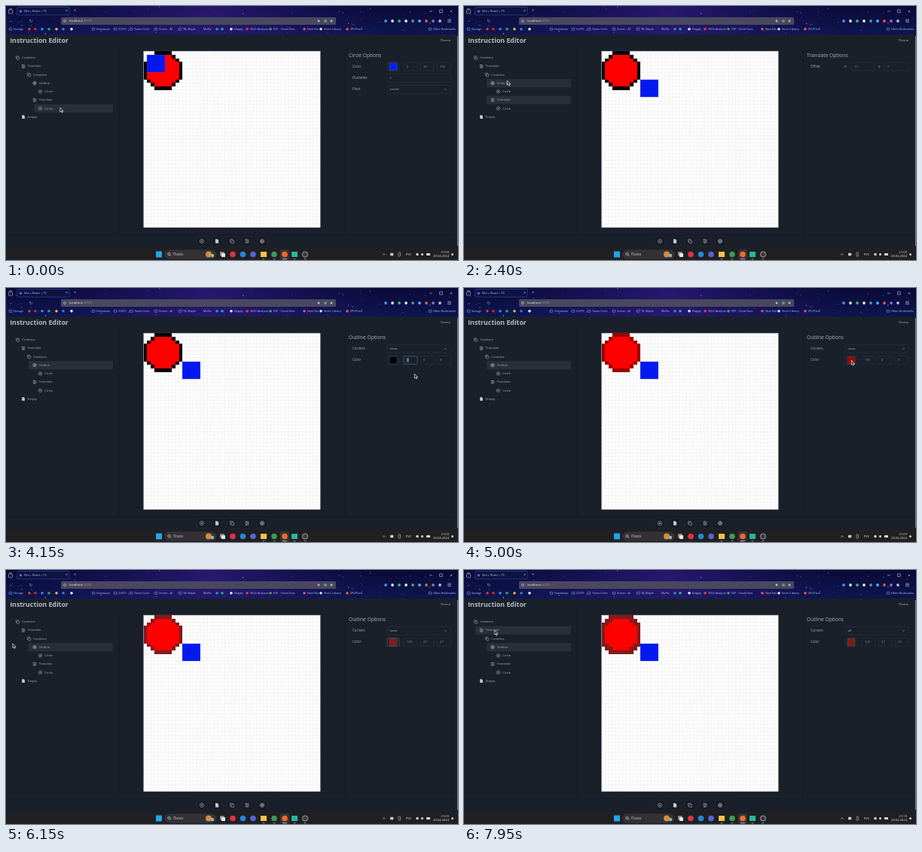
Animation, 600 px wide and 338 px high, one loop 8000 ms. Source, as an HTML page with a canvas:

```html
<!DOCTYPE html>
<html lang="en">
<head>
<meta charset="utf-8">
<title>Instruction Editor</title>
<style>
  html, body { margin: 0; width: 100%; height: 100%; overflow: hidden; background: #1a202a; }
  canvas { display: block; width: 600px; height: 338px; }
</style>
</head>
<body>
<canvas id="stage" width="600" height="338"></canvas>
<script>
const ctx = document.getElementById('stage').getContext('2d');
const LOOP = 8000, CELL = 4.69, LEFT = 182.7, TOP = 60.2;
const FONT = '"Open Sans", "Noto Sans", sans-serif';

// Drawing helpers
function rect(x, y, w, h, fill) {
  ctx.fillStyle = fill;
  ctx.fillRect(x, y, w, h);
}
function box(x, y, w, h, fill, stroke, radius = 1.2) {
  ctx.beginPath();
  ctx.roundRect(x, y, w, h, radius);
  if (fill) { ctx.fillStyle = fill; ctx.fill(); }
  if (stroke) { ctx.strokeStyle = stroke; ctx.lineWidth = 0.6; ctx.stroke(); }
}
function dot(x, y, r, fill) {
  ctx.beginPath();
  ctx.arc(x, y, r, 0, 7);
  ctx.fillStyle = fill;
  ctx.fill();
}
function ring(x, y, r, color, width = 0.6) {
  ctx.beginPath();
  ctx.arc(x, y, r, 0, 7);
  ctx.strokeStyle = color;
  ctx.lineWidth = width;
  ctx.stroke();
}
function line(color, width, ...points) {
  ctx.strokeStyle = color;
  ctx.lineWidth = width;
  ctx.beginPath();
  for (let i = 0; i < points.length; i += 2) ctx.lineTo(points[i], points[i + 1]);
  ctx.stroke();
}
function text(str, x, y, size, color, weight = 400, align = 'left') {
  ctx.font = `${weight} ${size}px ${FONT}`;
  ctx.textAlign = align;
  ctx.textBaseline = 'middle';
  ctx.fillStyle = color;
  ctx.fillText(str, x, y);
}
function verticalGradient(top, bottom, ...colors) {
  const gradient = ctx.createLinearGradient(0, top, 0, bottom);
  colors.forEach((c, i) => gradient.addColorStop(i / (colors.length - 1), c));
  return gradient;
}
function random(seed) {
  const v = Math.sin(seed * 127.1 + 3.7) * 43758.5453;
  return v - Math.floor(v);
}

// Timeline: stepped values and the pointer path
function step(t, keys) {
  let value;
  for (const [time, v] of keys) if (t >= time) value = v;
  return value;
}
const POINTER = [
  [0, 71.5, 135], [150, 71, 134], [380, 60, 124], [480, 60, 124], [850, 529, 79],
  [1150, 531, 86], [1320, 568, 80], [1450, 568, 108.5], [1800, 567, 110], [2350, 57, 99],
  [2700, 57, 100], [3350, 500, 100], [3800, 536, 95], [4000, 536, 95], [4150, 542, 114],
  [4650, 541, 112], [4900, 514, 96], [5050, 514, 96], [5350, 85, 30], [5500, 77.5, 21],
  [5700, 80, 40], [5800, 80, 40], [6000, 13, 97], [6150, 8.5, 97.5], [6350, 20, 99],
  [6900, 545, 80], [7100, 545, 80], [7250, 525, 96], [7400, 525, 96], [7850, 42, 82], [8000, 40, 79.5]
];
function pointerAt(t) {
  const i = POINTER.findIndex(k => k[0] > t);
  const [t0, x0, y0] = POINTER[i - 1], [t1, x1, y1] = POINTER[i];
  const p = (t - t0) / (t1 - t0), e = p * p * (3 - 2 * p);
  return [x0 + (x1 - x0) * e, y0 + (y1 - y0) * e];
}

function icon(kind, x, y, s = 1, color = '#98a2af') {
  ctx.save();
  ctx.translate(x, y);
  ctx.scale(s, s);
  if (kind === 'circle') {
    ring(0, 0, 2.3, color);
    dot(0, 0, 0.9, color);
  } else if (kind === 'outline') {
    ring(0, 0, 2.3, color);
    ring(0, 0, 1.1, color);
    line(color, 0.5, -2.3, 0, 2.3, 0);
    line(color, 0.5, 0, -2.3, 0, 2.3);
  } else if (kind === 'combine') {
    box(-2.2, -2.2, 3.2, 3.2, null, color, 0.5);
    box(-0.9, -0.9, 3.2, 3.2, '#1a202a', color, 0.5);
  } else if (kind === 'translate') {
    [-1.7, 0, 1.7].forEach((ly, i) => {
      line(color, 0.6, -2.4, ly, 2.4, ly);
      dot([-0.8, 1, -0.4][i], ly, 0.7, color);
    });
  } else {
    ctx.beginPath();
    ctx.moveTo(-1.8, -2.4); ctx.lineTo(0.6, -2.4); ctx.lineTo(1.9, -1.1);
    ctx.lineTo(1.9, 2.4); ctx.lineTo(-1.8, 2.4);
    ctx.fillStyle = '#c3cad3';
    ctx.fill();
  }
  ctx.restore();
}

// Browser window
const BOOKMARKS = [
  [10, 'Storage'], [120, 'Homebase'], [149, 'CLRTS'], [170, 'Tower Circle'], [203, 'Screen - AI'],
  [235, 'TK: Maple'], [262, 'MoRiz'], [303, 'Dapply'], [324, 'VELD Analyzer'], [355, 'EXP - Cloud Docs'],
  [400, 'NemTolu'], [422, "Vera's Library"], [457, 'ZPLPrism'], [567, 'Other Bookmarks']
];
const BOOKMARK_DOTS = [
  [31, '#e33'], [39, '#d22'], [48, '#3a8be8'], [57, '#35a853'], [67, '#f4b63a'], [76, '#3c78e0'],
  [87, '#eee'], [280, '#3b82e0'], [287, '#2fb573'], [299, '#e8e8f0'], [320, '#e23b3b'],
  [351, '#3fa35b'], [396, '#e0574f'], [418, '#ddd'], [453, '#ec5a35']
];
const TOOL_COLORS = ['#4b8cff', '#ddd', '#3bb96d', '#e6e6e6', '#599', '#42b9f5', '#e25a45', '#96d', '#bbb'];
function drawBrowser() {
  rect(0, 0, 600, 38, verticalGradient(0, 38, '#0a0a36', '#0d1650'));
  const glow = ctx.createRadialGradient(270, 8, 5, 270, 8, 240);
  glow.addColorStop(0, 'rgba(46,26,122,.8)');
  glow.addColorStop(1, 'rgba(30,20,100,0)');
  rect(0, 0, 600, 38, glow);
  for (let i = 0; i < 150; i++) {
    const shade = 0.25 + 0.65 * random(i + 900);
    dot(random(i) * 600, random(i + 300) * 37, 0.25 + 0.5 * random(i + 600) ** 3, `rgba(190,190,255,${shade})`);
  }
  box(3.5, 5, 5, 5, null, '#c5c8dc', 1);
  line('#c5c8dc', 0.7, 4, 4, 8, 4);
  box(15, 1.5, 69, 10.5, '#0e1440', '#2f4cb4', 1.5);
  dot(19.5, 7, 1.6, '#8a62e8');
  text('Vite + React + TS', 24, 6.8, 3.9, '#c3cbee');
  text('×', 79, 6.8, 5, '#ccd');
  text('+', 90, 6.8, 5.5, '#ccd');
  line('#ccd', 0.6, 562, 7, 566, 7);
  box(575.5, 5, 3.8, 3.8, null, '#ccd', 0.3);
  text('×', 591, 7, 6, '#dde', 400, 'center');

  text('←', 7, 20, 6, '#8f97cc', 400, 'center');
  text('→', 20, 20, 6, '#5a62a0', 400, 'center');
  text('↻', 33, 20, 6, '#8f97cc', 400, 'center');
  box(73, 15, 365, 10, '#4a485f', null, 1.6);
  ring(78, 20, 1.5, '#d5d5e0');
  text('localhost', 84, 20, 4.3, '#f2f2fa');
  text(':5173', 102.5, 20, 4.3, '#a3a2b4');
  dot(415, 20, 1.4, '#b9bccd');
  dot(424, 20, 2, '#56a06d');
  dot(432, 20, 1.4, '#b9bccd');
  TOOL_COLORS.forEach((color, i) => dot(504 + 9 * i, 20, 1.9, color));
  for (let y = 18; y < 23; y += 1.7) line('#ccd', 0.6, 586, y, 591, y);

  for (const [x, color] of BOOKMARK_DOTS) dot(x, 30.7, 1.8, color);
  for (const x of [6, 116, 145, 166, 199, 231, 563]) box(x - 1.8, 29.3, 3.6, 2.9, null, '#8fa6ea', 0.4);
  for (const [x, label] of BOOKMARKS) text(label, x, 30.8, 3.65, '#b3c2f2');
}

// Editor page
const TREE = [
  ['Combine', 0], ['Translate', 1], ['Combine', 2], ['Outline', 3],
  ['Circle', 4], ['Translate', 3], ['Circle', 4], ['Empty', 1]
];
function drawTree(selected, px, py) {
  TREE.forEach(([label, depth], i) => {
    const x = 15.5 + depth * 7.5, y = 69 + i * 11.22;
    const hovered = px > x - 8 && px < 142 && Math.abs(py + 0.8 - y) < 5.6;
    if (i === selected || hovered) box(x - 8, y - 5.5, 150 - x, 11, '#27303a');
    icon(label.toLowerCase(), x, y);
    text(label, x + 5.8, y + 0.1, 4.2, '#a6afbb');
  });
}

function isRed(x, y) {
  const reach = [4, 4, 4, 3, 2][Math.abs(y - 5)];
  return Math.abs(x - 5) <= reach;
}
function isEdge(x, y, corners) {
  for (let dy = -1; dy <= 1; dy++)
    for (let dx = -1; dx <= 1; dx++)
      if ((corners || !dx || !dy) && isRed(x + dx, y + dy)) return true;
  return false;
}
function drawArtboard([ox, oy], outline, corners) {
  const size = CELL * 50;
  rect(LEFT, TOP, size, size, '#fff');
  ctx.setLineDash([1.2, 0.8]);
  for (let i = 0; i <= 50; i++) {
    const d = i * CELL;
    line('#d6d6dd', 0.5, LEFT + d, TOP, LEFT + d, TOP + size);
    line('#d6d6dd', 0.5, LEFT, TOP + d, LEFT + size, TOP + d);
  }
  ctx.setLineDash([]);
  const snapX = n => Math.round(LEFT + n * CELL), snapY = n => Math.round(TOP + n * CELL);
  const block = (x, y, n, fill) =>
    rect(snapX(x), snapY(y), snapX(x + n) - snapX(x), snapY(y + n) - snapY(y), fill);
  for (let y = 0; y < 11; y++)
    for (let x = 0; x < 11; x++) {
      if (isRed(x, y)) block(x, y, 1, '#ff0000');
      else if (isEdge(x, y, corners)) block(x, y, 1, outline);
    }
  block(1 + ox, 1 + oy, 5, '#0419ee');
  ctx.setLineDash([1.2, 1.2]);
  ctx.strokeStyle = '#5a68e8';
  ctx.lineWidth = 0.5;
  ctx.strokeRect(snapX(1 + ox) + 0.3, snapY(1 + oy) + 0.3, 5 * CELL - 0.6, 5 * CELL - 0.6);
  ctx.setLineDash([]);
}

function field(x, y, w, value, focus, selected) {
  box(x, y - 5.3, w, 10.6, '#1a2029', focus ? '#5a6c7c' : '#2c3541');
  if (focus && selected) rect(x + 3.8, y - 2.8, 2.6 * value.length + 0.6, 5.6, '#3a6580');
  text(value, x + 4, y, 4.2, focus ? '#b4bec8' : '#919ba8');
}
function select(y, value) {
  field(506, y, 84, '');
  text(value, 509.5, y, 4.2, '#b4bdc8');
  line('#a0aab5', 0.6, 582, y - 0.8, 583.4, y + 0.6, 584.8, y - 0.8);
}
function label(str, x, y) {
  text(str, x, y + 0.2, 4.5, '#a4adb9');
}
function colorRow(y, rgb, focus, selected) {
  label('Color', 460, y);
  box(506, y - 5.3, 16, 10.6, '#1a2029', focus === 'swatch' ? '#5a6c7c' : '#2c3541');
  box(509, y - 4.8, 10, 9.8, `rgb(${rgb})`, '#4a515c', 0.5);
  rgb.forEach((v, i) => field(528 + 22 * i, y, 18, String(v), focus === i, selected));
}
function drawOptions(s) {
  text(s.panel + ' Options', 455, 66.5, 6.65, '#a9b2be');
  if (s.panel === 'Circle') {
    colorRow(80.6, [4, 25, 255].map((v, i) => [0, 32, 255][i]));
    label('Diameter', 460, 96);
    field(505.5, 96, 84.5, '6');
    label('Pivot', 460, 111);
    select(111, 'center');
  } else if (s.panel === 'Translate') {
    label('Offset', 460, 80.6);
    label('x:', 505, 80.6);
    field(514, 80.6, 31, s.xText, s.focus === 'x', s.selected);
    label('y:', 550, 80.6);
    field(558, 80.6, 32, s.yText, s.focus === 'y', s.selected);
  } else {
    label('Corners', 460, 81);
    select(81, s.corners ? 'all' : 'none');
    colorRow(96, s.rgb, s.focus, s.selected);
  }
}
function drawPage(s, px, py) {
  rect(0, 38, 600, 285, '#1a202a');
  text('Instruction Editor', 5.2, 46.6, 8.8, '#b3bcc8', 700);
  text('Theme', 590, 45.6, 4.1, '#b3bcc8', 400, 'right');
  line('#141922', 0.8, 150.5, 54, 150.5, 304);
  line('#141922', 0.8, 450.5, 54, 450.5, 304);
  line('#151a23', 0.8, 0, 304.5, 600, 304.5);
  rect(599, 40, 1, 279, '#7b8698');
  drawTree(s.node, px, py);
  drawArtboard(s.offset, `rgb(${s.rgb})`, s.corners);
  drawOptions(s);
  ['circle', 'empty', 'combine', 'translate', 'outline'].forEach((kind, i) => {
    box(253.5 + 20 * i, 306.5, 13, 13, '#171c25', '#222a34');
    icon(kind, 260 + 20 * i, 313, 1.15);
  });
}

// Colour dialog
const HUES = [0, 60, 100, 145, 180, 210, 300, 325];
const BRIGHTNESS = [75, 50, 40, 25, 15];
function drawDialog(t) {
  const late = t >= 5750;
  rect(0, 0, 149, 103, '#f0f0f0');
  rect(0, 0, 149, 9.5, '#050507');
  text('Цвет', 6, 4.8, 4, '#eee');
  text('×', 144, 4.8, 5.5, '#eee', 400, 'center');
  text('Основные цвета:', 5.5, 14.2, 3.7, '#222');
  for (let row = 0; row < 6; row++)
    HUES.forEach((hue, col) => {
      const fill = row < 5
        ? `hsl(${hue} ${row === 2 ? 45 : 100}% ${BRIGHTNESS[row]}%)`
        : `hsl(${hue} ${col % 3 ? 10 : 50}% ${col * 14}%)`;
      box(7 + col * 8, 18.2 + row * 7, 5, 4.2, fill, '#777', 0);
    });
  ctx.setLineDash([0.8, 0.8]);
  box(6, 17.2, 7, 6.2, null, '#222', 0);
  ctx.setLineDash([]);
  text('Дополнительные цвета:', 5.5, 66, 3.7, '#222');
  for (let i = 0; i < 16; i++) box(7 + (i % 8) * 8, 70.3 + (i >> 3) * 7, 5, 4.2, '#fff', '#999', 0);

  const spectrum = ctx.createLinearGradient(75, 0, 135, 0);
  for (let i = 0; i <= 6; i++) spectrum.addColorStop(i / 6, `hsl(${i * 60} 100% 50%)`);
  rect(75, 12, 60, 59, spectrum);
  rect(75, 12, 60, 59, verticalGradient(12, 71, 'rgba(128,128,128,0)', 'rgb(128,128,128)'));
  rect(139.5, 12, 4, 59, verticalGradient(12, 71, '#fff', '#f24a2c', '#000'));
  ctx.fillStyle = '#000';
  ctx.beginPath();
  ctx.moveTo(143.8, 53); ctx.lineTo(148, 49.5); ctx.lineTo(148, 56.5);
  ctx.fill();

  box(75, 73, 18, 12.5, late ? 'rgb(129,27,27)' : '#942b20', '#777', 0);
  text('Цвет/Заливка', 73, 88.5, 3.4, '#222');
  const rows = [
    ['Оттенок:', late ? 0 : 13, 'Красный:', late ? 129 : 149],
    ['Контраст:', late ? 157 : 220, 'Зеленый:', late ? 27 : 0],
    ['Яркость:', 73, 'Синий:', late ? 27 : 6]
  ];
  rows.forEach(([a, av, b, bv], i) => {
    const y = 76 + i * 7;
    [[a, av, 112], [b, bv, 139]].forEach(([name, value, x]) => {
      text(name, x - 0.8, y, 3.3, '#222', 400, 'right');
      box(x, y - 2.8, 8.5, 5.6, '#fff', '#999', 0);
      text(String(value), x + 1, y, 3.3, '#222');
    });
  });
  const button = (x, y, w, h, caption, color = '#222', edge = '#aaa') => {
    box(x, y, w, h, '#fafafa', edge, 0.6);
    text(caption, x + w / 2, y + h / 2, 3.7, color, 400, 'center');
  };
  button(5, 86.3, 65, 6.5, 'Определить цвет >>', '#999', '#ccc');
  button(5, 94.5, 21, 6.6, 'ОК', '#222', '#2876c8');
  button(28, 94.5, 20.5, 6.6, 'Отмена');
  button(75, 94.5, 72, 6.6, 'Добавить в набор');
}

// Taskbar
const APPS = [
  [301, '#e0304e'], [314.5, '#2489d6'], [328, '#5865d8'], [342, '#f4c34a'], [356, '#3a9c58'],
  [370, '#f06a2b'], [383, '#27b7a0'], [397, '#3a3a42']
];
function drawTaskbar(t) {
  rect(0, 322, 600, 16, '#202022');
  rect(199, 326.5, 8, 8, '#22a5ec');
  box(211, 325, 68, 11, '#333135', '#434045', 5.5);
  ring(216.5, 330, 1.6, '#ddd', 0.7);
  line('#ddd', 0.7, 217.7, 331.2, 219, 332.6);
  text('Поиск', 222, 330.6, 4.5, '#d2d2d6');
  dot(269, 330.5, 4, '#d98b3b');
  dot(274, 332, 2.2, '#85c0c8');
  box(284, 327, 5.5, 5.5, '#8b8b91', null, 0.4);
  box(286, 329, 5, 5, '#e8e8ea', null, 0.4);
  box(364, 324, 12, 13, '#353338', null, 1.5);
  for (const [x, color] of APPS) {
    if (x === 342 || x === 383) rect(x - 4, 327, 8, 7, color);
    else dot(x, 330.5, 3.8, color);
  }
  ring(397, 330.5, 3.6, '#ccc', 0.7);
  for (const x of [342, 356, 383, 397]) rect(x - 1.5, 336.3, 3, 0.8, '#999');
  rect(367, 336.2, 6, 1, '#e4a08a');
  line('#ddd', 0.7, 500.2, 331.4, 502, 329.6, 503.8, 331.4);
  box(510, 328.7, 4.2, 3.6, '#ccc', null, 0.5);
  box(521, 328, 2.6, 5, null, '#ccc', 0.6);
  text('РУС', 534.5, 330.6, 4.2, '#e5e5e8', 400, 'center');
  dot(546, 330.5, 1.7, '#ddd');
  dot(552.5, 330.5, 1.5, '#ddd');
  box(558, 329, 5, 3, '#ddd', null, 0.6);
  text(t < 7000 ? '21:09' : '21:10', 588, 327.6, 4.1, '#e5e5e8', 400, 'right');
  text('28.04.2024', 588, 333.4, 4.1, '#e5e5e8', 400, 'right');
  dot(592.5, 330.5, 1.5, '#ccc');
}

function drawPointer(x, y) {
  ctx.beginPath();
  [[0, 0], [0, 6.3], [1.5, 5], [2.6, 7.3], [3.6, 6.8], [2.6, 4.6], [4.6, 4.6]]
    .forEach(([dx, dy]) => ctx.lineTo(x + 0.4 + dx * 0.9, y + 0.4 + dy * 0.9));
  ctx.closePath();
  ctx.fillStyle = '#0b0b0d';
  ctx.fill();
  ctx.strokeStyle = '#fff';
  ctx.lineWidth = 0.7;
  ctx.stroke();
}

function stateAt(t) {
  const xText = step(t, [[0, '0'], [950, '1'], [1050, '10']]);
  const yText = step(t, [[0, '0'], [1700, '7']]);
  return {
    xText, yText,
    offset: [+xText, +yText],
    node: step(t, [[0, 6], [420, 5], [2500, 3]]),
    panel: step(t, [[0, 'Circle'], [420, 'Translate'], [2500, 'Outline']]),
    focus: step(t, [[0, null], [850, 'x'], [1350, 'y'], [2250, null], [3900, 0], [5000, null], [6050, 'swatch'], [6950, null]]),
    selected: step(t, [[0, true], [950, false], [1350, true], [1700, false], [3900, true], [4350, false]]),
    rgb: step(t, [[0, [0, 0, 0]], [4350, [1, 0, 0]], [4450, [15, 0, 0]], [4550, [155, 0, 0]], [6050, [129, 27, 27]]]),
    corners: t >= 7350,
    dialog: t >= 5050 && t < 6050
  };
}

function frame(now) {
  const t = now % LOOP, state = stateAt(t), [px, py] = pointerAt(t);
  drawPage(state, px, py);
  drawBrowser();
  drawTaskbar(t);
  if (state.dialog) drawDialog(t);
  drawPointer(px, py);
  requestAnimationFrame(frame);
}
requestAnimationFrame(frame);
</script>
</body>
</html>
```
